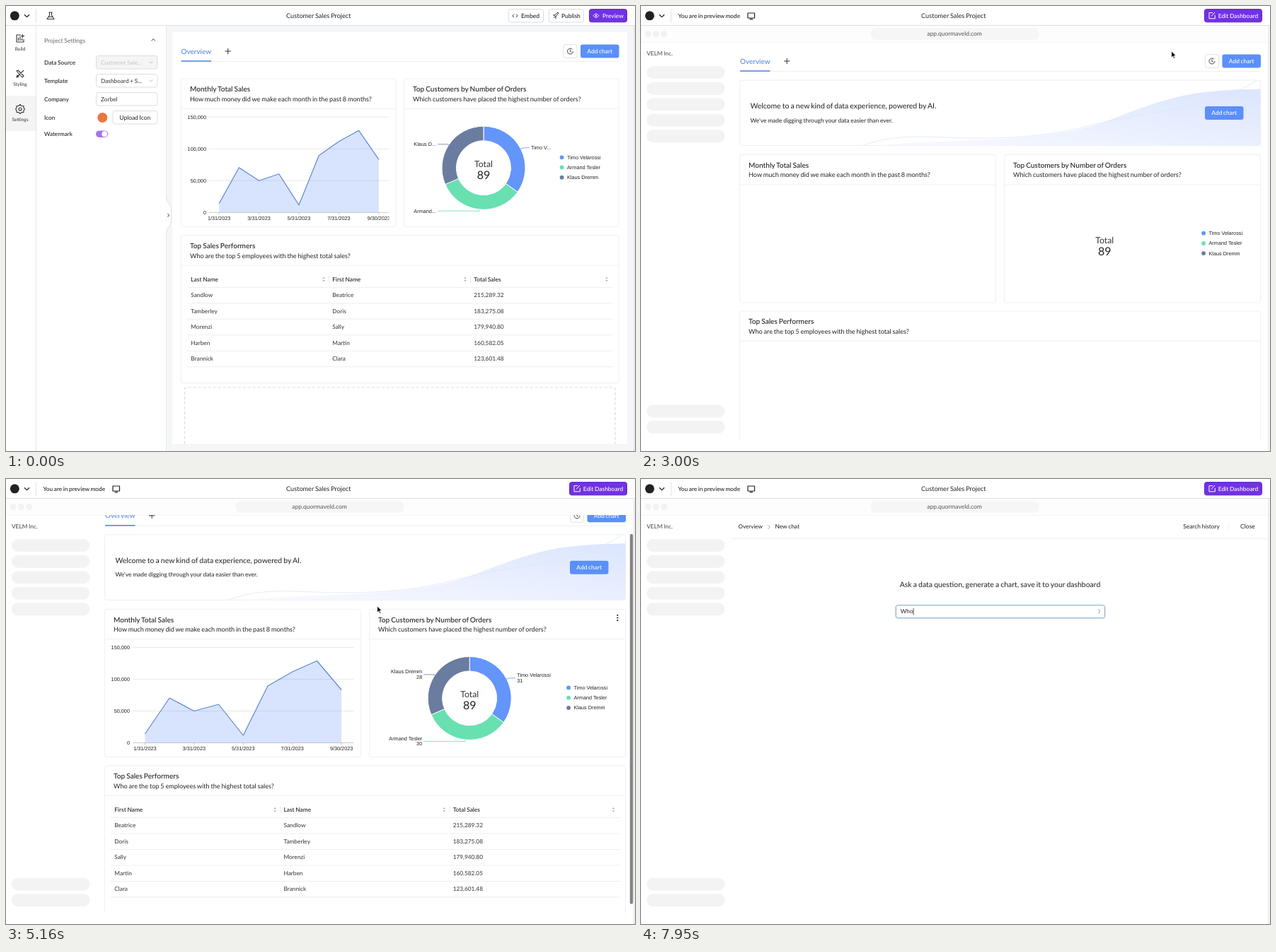
An HTML page that plays this animation: 889 by 630 pixels, repeating every 8 s.

```html
<!DOCTYPE html>
<html lang="en">
<head>
<meta charset="utf-8">
<title>Dashboard preview</title>
<style>
  html, body { margin: 0; height: 100%; overflow: hidden; background: #fff; }
  svg { display: block; width: 100vw; height: 100vh; }
  text { font-family: Lato, "Open Sans", sans-serif; word-spacing: -.05em; text-rendering: geometricPrecision; white-space: pre; }
  .axis text { font-family: "Liberation Sans", Arial, sans-serif; font-size: 7.3px; word-spacing: 0; fill: #222; }
</style>
</head>
<body>
<svg viewBox="0 0 889 630"></svg>
<script>
const LOOP = 8000, BLUE = '#5b8ff9', PURPLE = '#7132e2', LIGHT_PURPLE = '#9a5ef8', DARK_PURPLE = '#5f26c8';
const SERIES = [
  { name: 'Timo Velarossi', short: 'Timo V...', value: 31, color: '#6395fa' },
  { name: 'Armand Tesler', short: 'Armand...', value: 30, color: '#68e0b0' },
  { name: 'Klaus Dremm', short: 'Klaus D...', value: 28, color: '#6a7c9f' }
];
const STAFF = [
  ['Beatrice', 'Sandlow', '215,289.32'],
  ['Doris', 'Tamberley', '183,275.08'],
  ['Sally', 'Morenzi', '179,940.80'],
  ['Martin', 'Harben', '160,582.05'],
  ['Clara', 'Brannick', '123,601.48']
];
const SALES = [12.5, 63.5, 45, 54.5, 10.5, 80.5, 100.5, 116, 75];

// drawing helpers
const $ = id => document.getElementById(id);
const text = (x, y, s, size = 8.4, fill = '#222', more = '') =>
  `<text x="${x}" y="${y}" font-size="${size}" fill="${fill}" ${more}>${s}</text>`;
const rect = (x, y, w, h, fill = 'none', stroke = 'none', r = 3, more = '') =>
  `<rect x="${x}" y="${y}" width="${w}" height="${h}" rx="${r}" fill="${fill}" stroke="${stroke}" ${more}/>`;
const path = (d, stroke = '#333', width = 1, fill = 'none', more = '') =>
  `<path d="${d}" stroke="${stroke}" stroke-width="${width}" fill="${fill}" stroke-linejoin="round" ${more}/>`;
const dot = (x, y, r, fill, stroke = 'none') =>
  `<circle cx="${x}" cy="${y}" r="${r}" fill="${fill}" stroke="${stroke}"/>`;
const group = (id, body, more = '') => `<g id="${id}" ${more}>${body}</g>`;
const clip = (id, x, y, w, h) =>
  `<clipPath id="${id}"><rect x="${x}" y="${y}" width="${w}" height="${h}"/></clipPath>`;
const MID = 'text-anchor="middle" ', END = 'text-anchor="end" ', BOLD = 'font-weight="500"';

// dashboard pieces
function tabs(x, right, y) {
  return path(`M${x} ${y + 14.5}H${right}`, '#f0f0f0') +
    path(`M${x} ${y + 14}h42.5`, '#4f80df', 1.6) +
    text(x, y + 3.6, 'Overview', 10, '#4f7fdc') +
    path(`M${x + 62} ${y}h8.4m-4.2 -4.2v8.4`) +
    rect(right - 78, y - 9.5, 19, 19, '#fff', '#e2e2e2') +
    path(`M${right - 65.7} ${y - 2.8}a4 4 0 1 0 1.2 2.8M${right - 68.5} ${y - 2.5}v2.8l1.8 .8`, '#333', .9) +
    addButton(right - 54, y - 9.5, 'class="add"');
}

function addButton(x, y, more = '') {
  return rect(x, y, 54.5, 19, BLUE, 'none', 3, more) + text(x + 27.2, y + 12.4, 'Add chart', 8.4, '#fff', MID + BOLD);
}

function purpleButton(x, w, label, labelX, id) {
  return rect(x + .5, 4.5, w - 1, 18.3, PURPLE, DARK_PURPLE, 3, `id="${id}"`) + text(labelX, 17, label, 8.45, '#fff', BOLD);
}

function card(x, y, w, title, question) {
  return rect(x, y, w, 209.5, '#fff', '#f0f0f0') + path(`M${x} ${y + 42.5}h${w}`, '#f0f0f0') +
    text(x + 12.5, y + 18.4, title, 10.1, '#222', BOLD) + text(x + 12.5, y + 32, question, 9.12);
}

function salesChart(x, w, id) {
  const left = x + 39.5, width = w - 49.5, base = 292.3, step = width / 9;
  let axes = '';
  ['0', '50,000', '100,000', '150,000'].forEach((label, i) => {
    const y = base - 45 * i;
    axes += path(`M${left} ${y}h${width}`, i ? '#e3e3e3' : '#bbb', .8) + text(x + 35.5, y + 2.6, label, 7.3, '#222', END);
  });
  for (let i = 0; i < 5; i++) {
    const px = left + step * (2 * i + .5);
    axes += path(`M${px} ${base}v3`, '#bbb', .8) + text(px, base + 10.9, `${2 * i + 1}/${i == 4 ? 30 : 31}/2023`, 7.3, '#222', MID);
  }
  const line = 'M' + SALES.map((v, i) => `${left + step * (i + .5)} ${base - v}`).join('L');
  const area = `${line}V${base}H${left + step / 2}Z`;
  return clip(id + 'Clip', x, 140, w - 9.5, 170) + clip(id + 'Wipe', left, 140, width, 170) +
    group(id, group(id + 'Axes', axes, 'class="axis"') +
      `<g clip-path="url(#${id}Wipe)">` + path(area, 'none', 0, BLUE, 'fill-opacity=".24"') +
      path(line, '#5c86d2', 1.2) + '</g>', `clip-path="url(#${id}Clip)"`);
}

function ring(cx, cy, shown) {
  const total = SERIES.reduce((sum, s) => sum + s.value, 0);
  const at = (r, a) => `${cx + r * Math.sin(a)} ${cy - r * Math.cos(a)}`;
  let a = 0, out = '';
  for (const { value, color } of SERIES) {
    const next = a + value / total * 2 * Math.PI, b = Math.min(next, shown * 2 * Math.PI);
    if (b > a) out += path(`M${at(59, a)}A59 59 0 0 1 ${at(59, b)}L${at(38.5, b)}A38.5 38.5 0 0 0 ${at(38.5, a)}Z`, '#fff', 1, color);
    a = next;
  }
  return out;
}

function donut(cx, right, id, full) {
  const cy = 229.2;
  const leaders = [[67, -28.5, 'M52 -27L57 -28.5H65'], [-67, 61, 'M-6 59V61H-65'], [-67, -33.5, 'M-49 -32L-50 -33.5H-65']];
  let labels = '', legend = '';
  SERIES.forEach((s, i) => {
    const [x, y, d] = leaders[i], anchor = x < 0 ? END : '';
    labels += path(d, s.color, .8);
    labels += full
      ? text(x, y - 1.7, s.name, 7.3, '#222', anchor) + text(x, y + 6, s.value, 7.3, '#222', anchor)
      : text(x, y + 2.5, s.short, 7.3, '#222', anchor);
    legend += dot(right - 80.4, 214.3 + 14.2 * i, 2.9, s.color) + text(right - 73, 216.9 + 14.2 * i, s.name, 7.3);
  });
  return group(id, ring(cx, cy, 1)) +
    group(id + 'Labels', labels, `class="axis" transform="translate(${cx} ${cy})"`) +
    `<g class="axis">${legend}</g>` +
    text(cx, cy - 1, 'Total', 12.3, '#333', MID) + text(cx, cy + 16, '89', 16, '#222', MID);
}

function staffTable(x, w, id, firstLeft) {
  const step = (w - 18.5) / 3, left = x + 8, right = x + w - 8;
  const order = firstLeft ? [0, 1, 2] : [1, 0, 2];
  const heads = ['First Name', 'Last Name', 'Total Sales'];
  let out = '';
  order.forEach((k, i) => {
    const cx = x + 13.8 + step * i, sx = cx + step - 12.3;
    out += text(cx, 389.6, heads[k], 8.4, '#222', BOLD);
    out += path(`M${sx - 1.8} 385.8l1.8 -2 1.8 2zm0 2.2l1.8 2 1.8 -2z`, 'none', 0, '#aaa');
    if (i < 2) out += path(`M${sx + 7.5} 382v10`, '#e8e8e8');
    STAFF.forEach((row, j) => out += text(cx, 412.2 + 22.5 * j, row[k], 8.3, '#333'));
  });
  for (let j = 0; j < 6; j++) out += path(`M${left} ${398.3 + 22.5 * j}H${right}`, '#eee');
  return group(id, out);
}

function cards(x, w, x2, full, cx, id, firstLeft) {
  const right = x2 + w;
  return card(x, 103, w, 'Monthly Total Sales', 'How much money did we make each month in the past 8 months?') +
    salesChart(x, w, id + 'Line') +
    card(x2, 103, w, 'Top Customers by Number of Orders', 'Which customers have placed the highest number of orders?') +
    donut(cx, right, id + 'Pie', full) +
    card(x, 324.5, right - x, 'Top Sales Performers', 'Who are the top 5 employees with the highest total sales?') +
    staffTable(x, right - x, id + 'Table', firstLeft);
}

// scenes
function editor() {
  const field = (y, label, value, muted) => text(54, y + 3, label, 8.3, '#222', BOLD) +
    rect(127.5, y - 9, 86.5, 18.5, muted ? '#f5f5f5' : '#fff', '#ddd') + text(134, y + 3, value, 8.3, muted ? '#c4c4c4' : '#333');
  const drop = y => path(`M202.5 ${y - 1}l2.5 2.5 2.5 -2.5`, '#bbb', .9);
  const item = (y, label, icon) => text(20, y + 17, label, 6.6, '#333', MID) + `<g transform="translate(20 ${y})">${path(icon, '#333', 1.1)}</g>`;
  return rect(0, 0, 889, 630, '#fff') + rect(226, 27, 663, 603, '#f5f6f8', 'none', 0) + rect(235, 37, 643, 583, '#fff', 'none', 0) +
    rect(0, 127, 42, 50, '#f4f4f4', 'none', 0) +
    path('M42.5 28V630M226.5 28V270M226.5 322V630', '#e6e6e6') +
    path('M226.5 270q0 5 3.5 9t3.5 9v16q0 5 -3.5 9t-3.5 9', '#e0e0e0', 1, '#fff') + path('M228.5 294l2 2.3 -2 2.3') +
    item(46, 'Build', 'M1 -5H-5V5H5V1M-2.5 3V-1M0 3V-3M2.5 3V0M3.5 -6v5M1 -3.5h5') +
    item(96, 'Styling', 'M-5 5L5 -5M-5 -4l2 -1 8 8 -2 2zM-5 5l1 -3 2 2z') +
    item(146, 'Settings', 'M0 -6.5L2 -4.6 5 -4.5 5 -1.8 6.5 0 5 1.8 5 4.5 2 4.6 0 6.5 -2 4.6 -5 4.5 -5 1.8 -6.5 0 -5 -1.8 -5 -4.5 -2 -4.6ZM2 0A2 2 0 1 1 -2 0 2 2 0 1 1 2 0') +
    path('M60.5 9h5M61.5 9v4l-3.5 5.5h10L64.5 13V9M60 15.5h6', '#333', 1.1) +
    rect(710.5, 4.5, 49, 18.5, '#fff', '#ddd') + path('M718 11.5l-2 2.3 2 2.3M721 11.5l2 2.3 -2 2.3') + text(728, 17, 'Embed', 8.6, '#222', BOLD) +
    rect(767.5, 4.5, 49, 18.5, '#fff', '#ddd') + path('M774 17l2 -2M775 13l5 -4 1 1 -4 5zM775 13l-2 0M777 15v3') + text(785, 17, 'Publish', 8.4, '#222', BOLD) +
    purpleButton(824, 54, 'Preview', 843, 'previewButton') +
    path('M830 13.7q4 -5.4 8 0q-4 5.4 -8 0z', '#fff', .9) + dot(834, 13.7, 1.2, '#fff') +
    text(54, 51.5, 'Project Settings', 8.55, '#666') + path('M205.5 49.3l2.7 -2.7 2.7 2.7') +
    field(79.5, 'Data Source', 'Customer Sale...', true) + drop(79.5) +
    field(105.5, 'Template', 'Dashboard + S...') + drop(105.5) +
    field(131.5, 'Company', 'Zorbel') +
    text(54, 160.5, 'Icon', 8.3, '#222', BOLD) + dot(136.3, 158, 7, '#f0743e') +
    rect(151, 148.5, 63, 18.5, '#fff', '#ddd') + text(182.3, 160.6, 'Upload Icon', 8.45, '#222', MID) +
    text(54, 183.5, 'Watermark', 8.1, '#222', BOLD) + rect(127, 176.4, 17.3, 9.6, '#a673ee', 'none', 4.8) + dot(139.3, 181.2, 3.9, '#fff') +
    tabs(247.5, 866, 64) + cards(247.5, 303.5, 562.5, false, 675, 'edit', false) +
    path('M252.5 620V543q0 -3 3 -3H858q3 0 3 3V620', '#dadae6', 1.2, 'none', 'stroke-dasharray="4 3"');
}

function banner() {
  return clip('bannerClip', 139.5, 105, 736, 92.5) +
    '<linearGradient id="wave" x1="0" y1="1" x2="1" y2="0"><stop stop-color="#f8faff"/><stop offset="1" stop-color="#dbe5fd"/></linearGradient>' +
    rect(139.5, 105, 736, 92.5, '#fff', '#eee') +
    '<g clip-path="url(#bannerClip)">' +
    path('M330 198C400 190 480 193 560 184S650 165 700 147S780 119 876 117.5V198Z', 'none', 0, 'url(#wave)') +
    path('M312 198C350 184 380 184 430 186S560 190 640 168S800 150 870 106', '#dde5f8', .8) + '</g>' +
    text(154.5, 145, 'Welcome to a new kind of data experience, powered by AI.', 10.44) +
    text(154.5, 164.6, "We've made digging through your data easier than ever.", 8.44) + addButton(797, 142);
}

function preview() {
  const pills = [85, 107.7, 130.2, 152.7, 175.2, 564.7, 587.2].map(y => rect(8, y, 110.5, 18, '#f3f3f3', 'none', 9)).join('');
  return rect(0, 0, 889, 630, '#fff') + rect(0, 28, 887, 23, '#fdfdfd', 'none', 0) + path('M0 51.5H887', '#f5f5f5') +
    text(52.5, 16.8, 'You are in preview mode', 8.25, '#222', BOLD) +
    path('M151 10h9.5v7h-9.5zM153.5 18.7h4.5', '#222', 1.2) +
    purpleButton(796, 82, 'Edit Dashboard', 815.7, 'editButton') +
    path('M808 9.5h-5v8.3h8.3v-5M806 14.5l5 -5.5', '#fff') +
    [10, 21.3, 32.6].map(x => dot(x, 39.5, 4.5, '#f2f2f2')).join('') +
    rect(324.5, 31, 238, 17, '#f6f6f6', 'none', 8) + text(443, 42.2, 'app.quormaveld.com', 8.5, '#555', MID) +
    text(8, 70, 'VELM Inc.', 8.3, '#444') + pills +
    clip('view', 128, 51, 759, 563) +
    group('dash', group('scroller',
      group('tabRow', tabs(140, 875.5, 78)) +
      group('cards', banner() + `<g transform="translate(0 107.4)">${cards(139.5, 362, 513.5, true, 655.2, 'view', true)}</g>` +
        group('menu', [219, 222.7, 226.4].map(y => dot(864.3, y, 1.1, '#222')).join('')))
    ) + rect(881.8, 52, 4.4, 524, '#858585', 'none', 2.2, 'id="thumb"'), 'clip-path="url(#view)"') +
    group('chat',
      text(137.5, 70.4, 'Overview', 8.1) + path('M179.5 65.3l2.6 2.8 -2.6 2.8', '#999', .9) + text(189.5, 70.4, 'New chat', 8.35) +
      text(766.3, 70.4, 'Search history', 8.35) + path('M830.5 64v8', '#eee') + text(847, 70.4, 'Close', 8.6) + path('M128 84.5H887', '#f0f0f0') +
      text(507.5, 152.8, 'Ask a data question, generate a chart, save it to your dashboard', 10.45, '#222', MID) +
      rect(360, 178.8, 295.5, 18, '#fff', '#e4eef6', 3, 'stroke-width="2.6"') + rect(360.3, 178.8, 295.2, 18, '#fff', '#8aa9bb') +
      text(366.8, 190.4, '', 8.3, '#222', 'id="query"') + path('M0 183v9.5', '#222', .8, 'none', 'id="caret"') +
      path('M646.5 184q3.4 3.4 0 6.8', '#7c9fe0', 1, 'none', 'id="send"'));
}

document.querySelector('svg').innerHTML = preview() + group('editor', editor()) +
  dot(12.3, 13.8, 6.5, '#222') + path('M26 12.2l3.5 3.4 3.5 -3.4', '#222', 1.3) +
  path('M42.5 4V24', '#e3e3e3') + path('M0 27.5H889', '#dedede') + path('M887.5 28V630', '#dcdcdc') +
  text(441.8, 17.2, 'Customer Sales Project', 9.15, '#222', MID) +
  group('cursor',
    path('M0 0V9L2.1 7.1 3.6 10.4 5.1 9.7 3.6 6.5H6.4Z', '#fff', .8, '#000', 'id="arrow"') +
    path('M-1 1Q0 -1 1 1V4L4.5 4.8Q6 5.2 5.7 7L5 10H.2L-2.8 6.4Q-2.6 4.6 -1 6Z', '#222', .9, '#fff', 'id="hand"'));

// motion
const ramp = (t, a, b) => Math.min(1, Math.max(0, (t - a) / (b - a)));
const smooth = p => p * p * (3 - 2 * p);
const quadOut = p => 1 - (1 - p) ** 2;
const fade = (id, value) => $(id).setAttribute('opacity', value);
const fill = (el, color) => el.setAttribute('fill', color);
const addTop = document.querySelector('#tabRow .add');
const MOVES = [[50, 172, 134], [1650, 841.5, 15], [2580, 841.5, 15], [3700, 552.5, 169], [3850, 552.5, 169],
  [4220, 524.7, 180], [5720, 524.7, 180], [5950, 542.7, 181.2], [6320, 847, 76]];

function pointerAt(t) {
  let [, x, y] = MOVES[0];
  for (let i = 1; i < MOVES.length; i++) {
    const [t0, x0, y0] = MOVES[i - 1], [t1, x1, y1] = MOVES[i];
    if (t < t0) break;
    const p = smooth(ramp(t, t0, t1));
    x = x0 + (x1 - x0) * p;
    y = y0 + (y1 - y0) * p;
  }
  return [x, y];
}

function draw(t) {
  const [x, y] = pointerAt(t);
  const onBar = y < 23 && x > (t < 1950 ? 824 : 796), onAdd = t > 5000 && x > 821 && y < 88;
  $('cursor').setAttribute('transform', `translate(${x} ${y})`);
  fade('cursor', +(t >= 50 && t < 6700));
  fade('hand', +(onBar || onAdd));
  fade('arrow', +!(onBar || onAdd));
  fill($('previewButton'), onBar ? LIGHT_PURPLE : PURPLE);
  fill($('editButton'), onBar ? LIGHT_PURPLE : PURPLE);
  fill(addTop, onAdd ? '#7fa9fb' : BLUE);

  fade('editor', 1 - ramp(t, 1900, 2050));
  fade('tabRow', ramp(t, 2380, 2830));
  fade('cards', ramp(t, 2500, 2950));
  fade('dash', 1 - ramp(t, 6530, 6700));
  fade('chat', ramp(t, 6750, 7180));

  const shown = quadOut(ramp(t, 3790, 4240));
  $('viewPie').innerHTML = ring(655.2, 229.2, shown);
  fade('viewPieLabels', ramp(t, 4150, 4300));
  fade('viewLineAxes', ramp(t, 3860, 4060));
  $('viewLineWipe').firstChild.setAttribute('width', 312.5 * quadOut(ramp(t, 3870, 4320)));
  fade('viewTable', ramp(t, 3900, 4050));

  const scroll = 39 * (smooth(ramp(t, 4270, 4790)) - smooth(ramp(t, 5000, 5420)));
  $('scroller').setAttribute('transform', `translate(0 ${-scroll})`);
  $('thumb').setAttribute('y', 51.5 + scroll);
  fade('thumb', ramp(t, 4260, 4340) * (1 - ramp(t, 5680, 5880)));
  fade('menu', +(scroll > 25));

  const typed = t < 7530 ? '' : t < 7740 ? 'W' : t < 7850 ? 'Wh' : 'Who';
  const query = $('query');
  query.textContent = typed || 'Type your question';
  fill(query, typed ? '#222' : '#bbb');
  const end = 367.2 + (typed ? query.getComputedTextLength() : 0);
  $('caret').setAttribute('transform', `translate(${end} 0)`);
  fade('send', ramp(t, 7740, 7900));
}

const start = performance.now();
function tick() {
  draw((performance.now() - start) % LOOP);
  requestAnimationFrame(tick);
}
tick();
</script>
</body>
</html>
```
